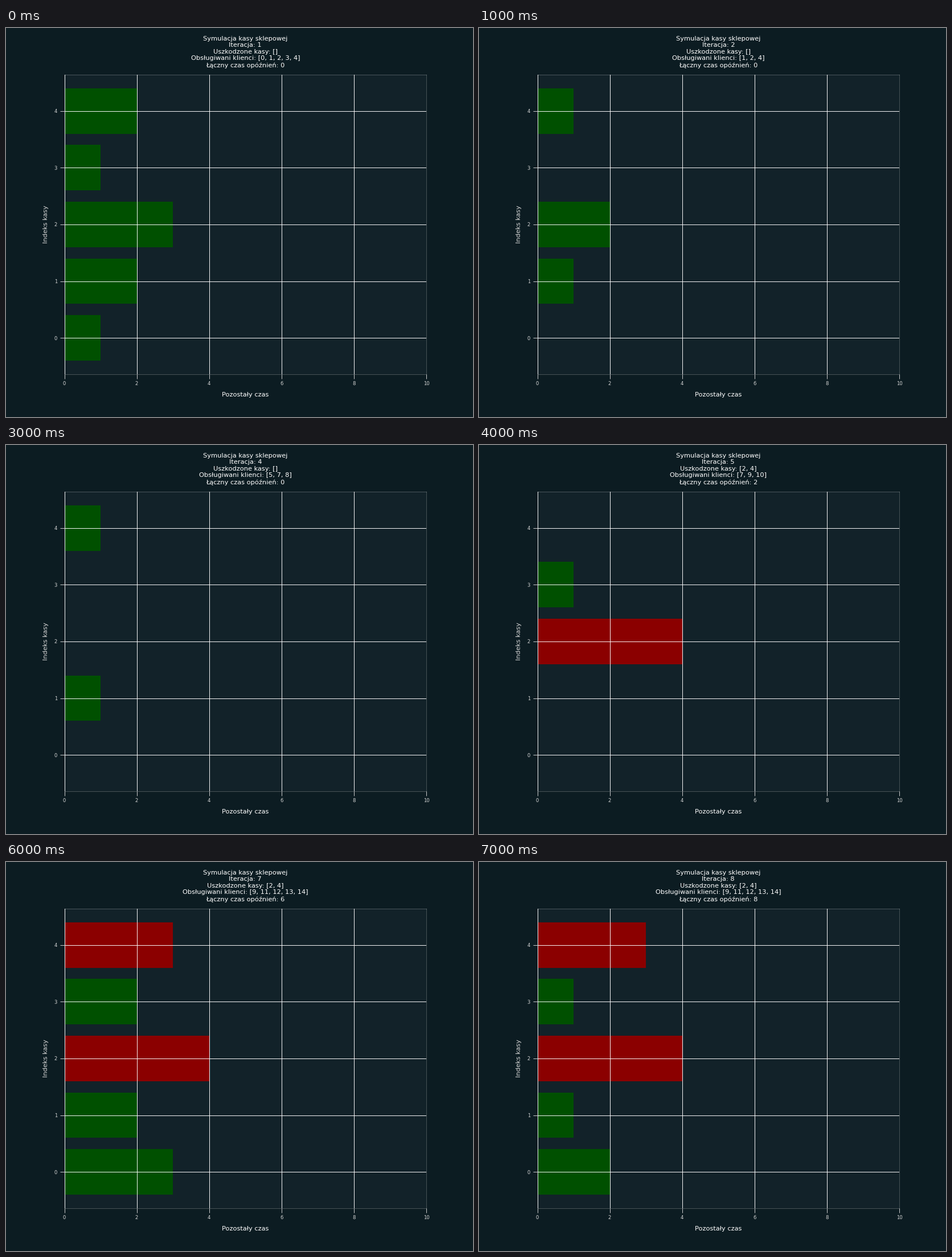
A matplotlib script that plays this animation: 820x683 px, repeating every 8000 ms.

```python
import matplotlib.pyplot as plt
from matplotlib.animation import FuncAnimation

WIDTH, HEIGHT, DPI = 820, 683, 68.3
BACK, PANEL = "#0c1c22", "#122229"
GREEN, RED = "#005000", "#8b0000"
LIGHT = "#d5d5d5"
GRID = (1, 1, 1, 0.25)

# Remaining time per register, customers being served
STEPS = [
    ([1, 2, 3, 1, 2], [0, 1, 2, 3, 4]),
    ([0, 1, 2, 0, 1], [1, 2, 4]),
    ([0, 0, 1, 1, 1], [2, 5, 6]),
    ([0, 1, 0, 0, 1], [5, 7, 8]),
    ([0, 0, 4, 1, 0], [7, 9, 10]),
    ([4, 0, 4, 0, 3], [9, 11, 12]),
    ([3, 2, 4, 2, 3], [9, 11, 12, 13, 14]),
    ([2, 1, 4, 1, 3], [9, 11, 12, 13, 14]),
]
FAILURE_STEP = 4
FAILED = [2, 4]

plt.rcParams["font.family"] = "DejaVu Sans"
# The small margin keeps the pixel size from rounding down
size = ((WIDTH + 0.01) / DPI, (HEIGHT + 0.01) / DPI)
fig, ax = plt.subplots(figsize=size, dpi=DPI, facecolor=BACK)
fig.subplots_adjust(left=0.125, right=0.9, bottom=0.11, top=0.88)

ax.set_facecolor(PANEL)
ax.set_xlim(0, 10)
ax.set_ylim(-0.64, 4.64)
ax.set_xticks(range(0, 11, 2))
ax.set_yticks(range(5))
ax.set_axisbelow(False)
ax.grid(True, color=GRID, linewidth=1)
ax.tick_params(length=8, width=1, pad=5, color=LIGHT, labelcolor=LIGHT, labelsize=9)
for spine in ax.spines.values():
    spine.set_edgecolor(GRID)
    spine.set_linewidth(1)
ax.set_xlabel("Pozostały czas", fontsize=12, color="white", labelpad=10)
ax.set_ylabel("Indeks kasy", fontsize=12, color=LIGHT, labelpad=10)

bars = ax.barh(range(5), [0] * 5, height=0.8, linewidth=0)
title = ax.set_title("", fontsize=12, color="white", pad=14)


def update(step):
    times, customers = STEPS[step]
    failed = FAILED if step >= FAILURE_STEP else []
    delay = len(failed) * (step - FAILURE_STEP + 1)
    for i, (bar, time) in enumerate(zip(bars, times)):
        bar.set_width(time)
        bar.set_facecolor(RED if i in failed else GREEN)
    title.set_text(
        "Symulacja kasy sklepowej\n"
        f"Iteracja: {step + 1}\n"
        f"Uszkodzone kasy: {failed}\n"
        f"Obsługiwani klienci: {customers}\n"
        f"Łączny czas opóźnień: {delay}"
    )
    return [*bars, title]


anim = FuncAnimation(fig, update, frames=len(STEPS), interval=1000, repeat=True)
plt.show()
```
